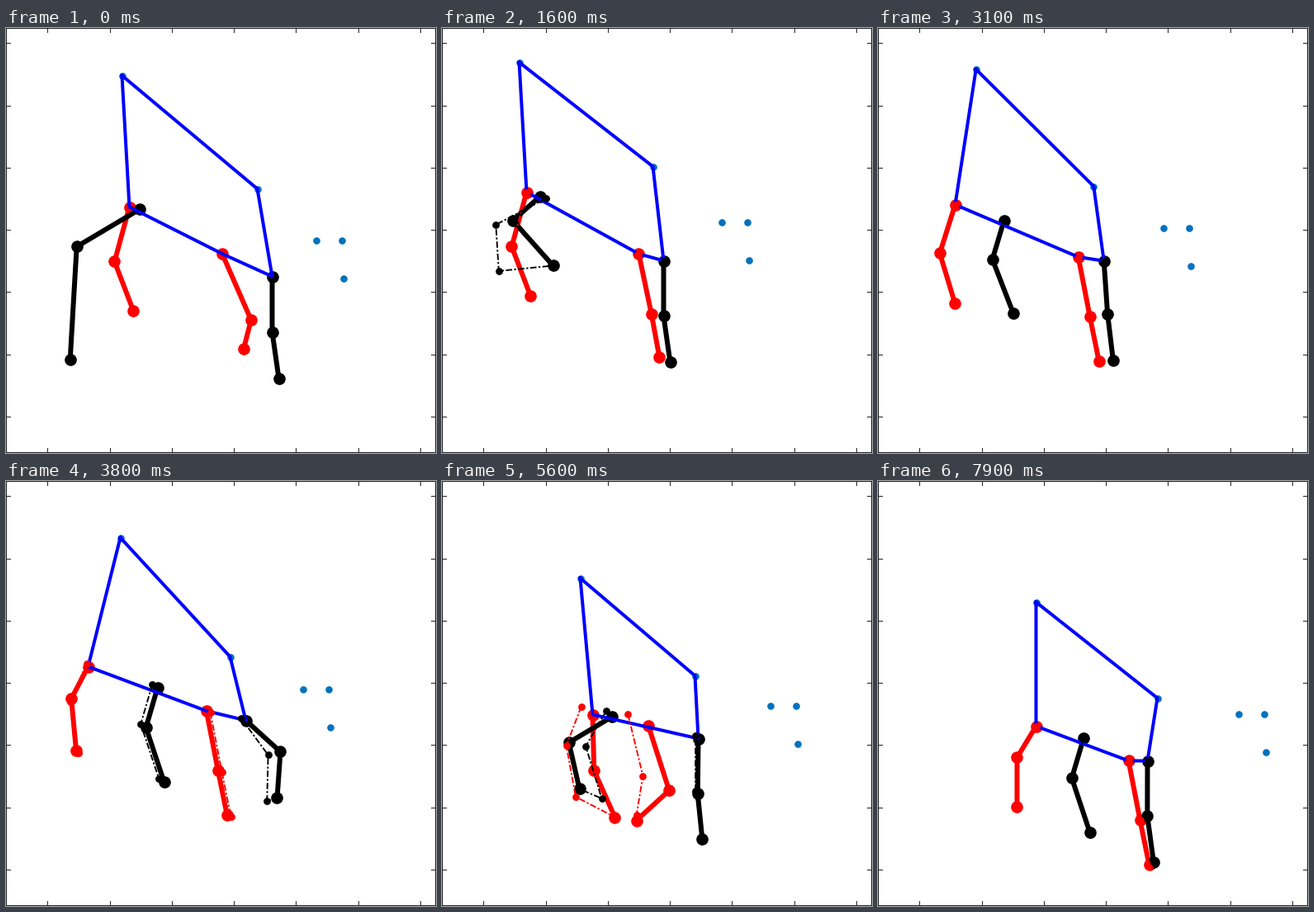
These frames come from a looping animation (521x514 px, 8 s). A matplotlib script:

```python
import numpy as np
import matplotlib.pyplot as plt
from matplotlib.animation import FuncAnimation
from matplotlib.patches import Rectangle

W, H, DPI = 521, 514, 100
FRAMES, STEP_MS, HOLD = 80, 100, 3
PX = 72 / DPI
TEAL = "#0072bd"

# Trunk paths: one point per key step, straight moves between them.
KEYS = (0, 5, 8, 13, 19, 22, 26)
RUMP = ((150, 217), (103, 199), (90, 207), (100, 225),
        (183, 283), (188, 293), (192, 297))
CHEST = ((323, 301), (269, 282), (263, 277), (291, 290),
         (311, 312), (328, 340), (327, 339))
TOP = ((141, 58), (94, 42), (106, 38), (139, 69),
       (168, 118), (185, 128), (192, 147))
SHOULDER = ((305, 195), (256, 168), (255, 178), (272, 213),
            (307, 236), (339, 256), (339, 263))
NOSE = ((376, 257), (339, 235), (338, 236), (360, 252),
        (398, 272), (420, 278), (437, 282))
HEAD = np.array(((0, 0), (31, 0), (33, 46)))

# Leg: colour, resting thigh and shank, then strides as
# (centre, width, thigh change, shank change).
LEGS = {
    "hind_red": ("red", (-18, 66), (23, 60), (
        (15, 4, (-3, -35), (-22, 4)),
        (19.3, 0.8, (24, 17), (12, -6)),
        (26, 3, (-5, -28), (-23, 0)))),
    "front_red": ("red", (14, 72), (11, 54), (
        (0, 3, (21, 8), (-20, -19)),
        (19, 1, (11, 6), (-51, -18)),
        (22, 1.5, (4, -3), (15, 9)))),
    "hind_black": ("black", (-14, 48), (22, 66), (
        (0, 3.5, (-62, -3), (-30, 71)),
        (4, 1, (-30, -10), (-25, -25)),
        (6.5, 2, (0, -26), (70, -20)),
        (21, 2, (-105, -45), (-25, -27)))),
    "front_black": ("black", (0, 67), (8, 56), (
        (13, 2, (42, -29), (-12, 0)),
        (22, 2, (-7, -3), (-23, -9)))),
}
LEAP = 50  # a foot moving further than this leaves its thin leg behind


def bump(k, centre, width):
    return np.exp(-((k - centre) / width) ** 2)


def along(path, k):
    return np.array([np.interp(k, KEYS, c) for c in zip(*path)])


def hips(k):
    rump, chest = along(RUMP, k), along(CHEST, k)
    hind = 0.07 + 0.37 * (bump(k, 13, 5) + bump(k, 27, 5))
    fore = 0.83 - 0.18 * bump(k, 0, 3) - 0.47 * bump(k, 17, 3)
    return {
        "hind_red": rump,
        "front_black": chest,
        "hind_black": rump + hind * (chest - rump) - (0, 3),
        "front_red": rump + fore * (chest - rump) + (0, 28 * (fore - 0.58)),
    }


def legs(k):
    pose = {}
    for name, hip in hips(k).items():
        _, thigh, shank, strides = LEGS[name]
        thigh, shank = np.array(thigh, float), np.array(shank, float)
        for centre, width, d_thigh, d_shank in strides:
            b = bump(k, centre, width)
            thigh += b * np.array(d_thigh)
            shank += b * np.array(d_shank)
        pose[name] = np.array((hip, hip + thigh, hip + thigh + shank))
    return pose


fig = plt.figure(figsize=(W / DPI, H / DPI), dpi=DPI, facecolor="white")
ax = fig.add_axes((0, 0, 1, 1))
ax.set(xlim=(0.5, W + 0.5), ylim=(H + 0.5, 0.5))
ax.axis("off")


def line(color, width, z, size=0, **style):
    return ax.plot([], [], color=color, lw=width * PX, zorder=z, snap=False,
                   marker="o" if size else "", ms=size * PX, mew=0, **style)[0]


def bar(x, y, w, h):
    ax.add_patch(Rectangle((x + 0.5, y + 0.5), w, h, fc="#262626", lw=0,
                           antialiased=False, zorder=0))


for x in (0, W - 1):
    bar(x, 0, 1, H)
for y in (0, H - 1):
    bar(0, y, W, 1)
for n in range(7):
    x, y = round(50.3 + 75.25 * n), round(18.3 + 75.25 * n)
    for edge in (0, H - 6):
        bar(x, edge, 1, 6)
    for edge in (0, W - 6):
        bar(edge, y, 6, 1)

dots = line(TEAL, 0, 1, 8.6, ls="")
body = line("blue", 4, 4, solid_joinstyle="round")
thick, thin, joints = {}, {}, {}
for z, (name, (color, *_)) in enumerate(LEGS.items()):
    thick[name] = line(color, 6, 2 + z / 10, 14.6, solid_joinstyle="round")
    thin[name] = line(color, 1.9, 5 + z / 10, ls=(0, (4, 1.3, 1.2, 1.3)))
    joints[name] = line(color, 0, 5 + z / 10, 8.8, ls="")


def draw(i):
    k, phase = divmod(i + 1, HOLD)
    pose, before = legs(k), legs(max(k - 1, 0))
    for name, now in pose.items():
        thick[name].set_data(*now.T)
        move = before[name] - now
        leap = np.hypot(*move[-1]) > LEAP
        ghost = now + move * (1 if leap else 1 - phase / (HOLD - 1))
        thin[name].set_data(*np.vstack((ghost, now[-1])).T)
        joints[name].set_data(*ghost.T)
        for part in (thin[name], joints[name]):
            part.set_visible(k > 0)

    rump, chest = along(RUMP, k), along(CHEST, k)
    top, shoulder = along(TOP, k), along(SHOULDER, k)
    x, y = pose["front_red"][0]
    belly = x, max(y, np.interp(x, (rump[0], chest[0]), (rump[1], chest[1])))
    body.set_data(*np.vstack((top, rump, belly, chest, shoulder, top)).T)
    dots.set_data(*np.vstack((top, shoulder, along(NOSE, k) + HEAD)).T)
    return [dots, body, *thick.values(), *thin.values(), *joints.values()]


anim = FuncAnimation(fig, draw, frames=FRAMES, interval=STEP_MS,
                     repeat=True, repeat_delay=0, blit=False)
plt.show()
```
